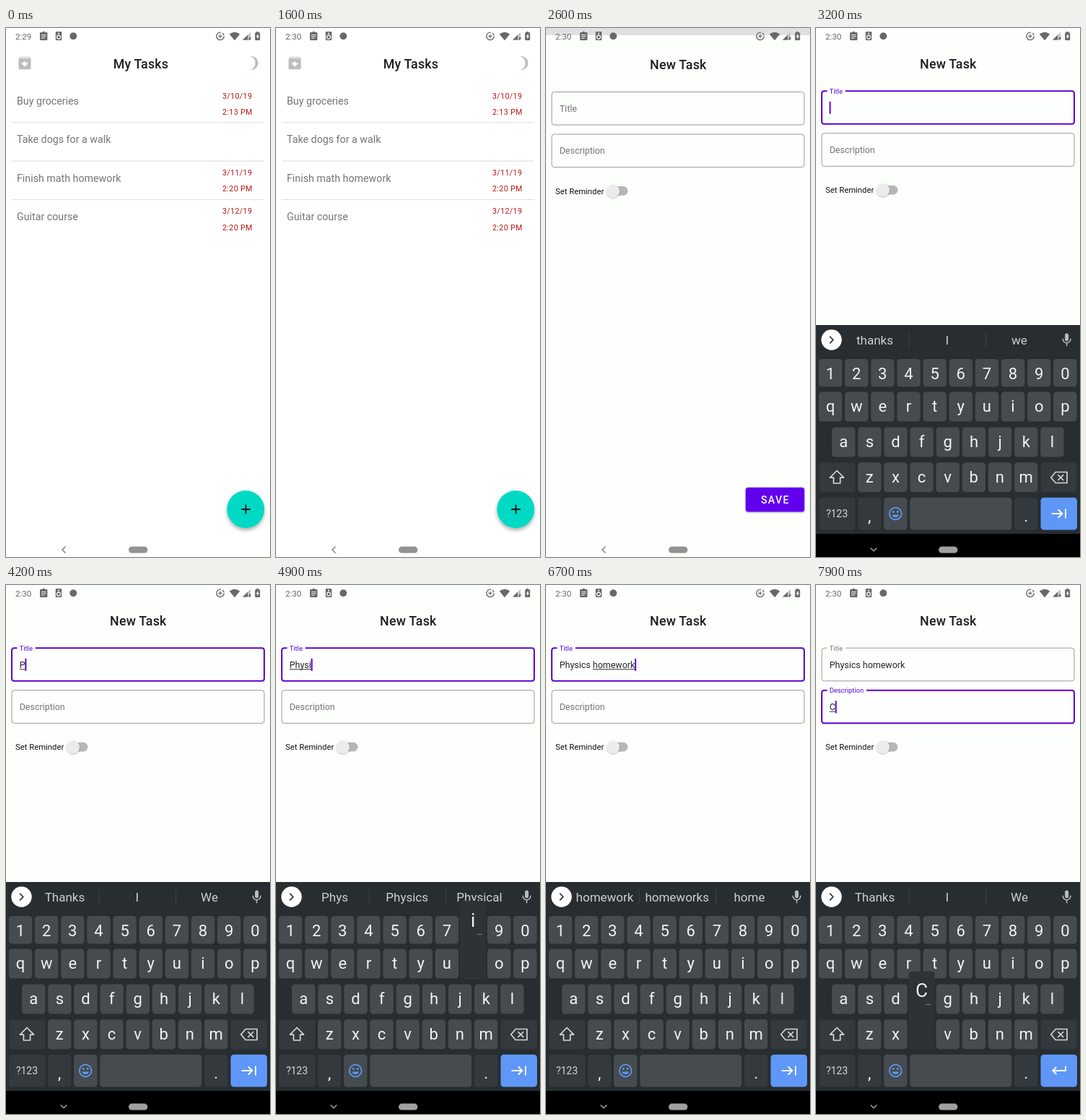
These frames come from a looping animation (366 by 732 pixels, 8 s). An HTML page:

```html
<!DOCTYPE html>
<html lang="en">
<head>
<meta charset="utf-8">
<title>Task list</title>
<style>
html, body { margin: 0; width: 100%; height: 100%; overflow: hidden; background: #fff; }
svg { display: block; width: 100%; height: 100%; font-family: Roboto, "Open Sans", sans-serif; }
text { white-space: pre; }
.mid { text-anchor: middle; }
.head { font-size: 17.8px; font-weight: 500; letter-spacing: .22px; fill: #1d1d1f; text-anchor: middle; }
.item { font-size: 14.24px; fill: #757575; }
.due { font-size: 10.68px; letter-spacing: .36px; fill: #b81414; }
.typed { font-size: 12.46px; fill: #222; }
.key { font-size: 22px; fill: #f1f3f4; text-anchor: middle; }
.pop { font-size: 26px; fill: #f1f3f4; text-anchor: middle; }
.hint { font-size: 17px; fill: #ccd0d3; text-anchor: middle; }
.line { fill: none; stroke-linecap: square; }
</style>
</head>
<body>
<svg id="stage" viewBox="0 0 366 732" preserveAspectRatio="none"></svg>
<script>
const LOOP = 8000;
const PURPLE = '#5d00d6';
const stage = document.getElementById('stage');
const $ = id => document.getElementById(id);

// ---------- markup helpers ----------
const rect = (x, y, w, h, fill, r = 0, more = '') =>
  `<rect x="${x}" y="${y}" width="${w}" height="${h}" rx="${r}" fill="${fill}" ${more}/>`;
const circle = (x, y, r, fill, more = '') =>
  `<circle cx="${x}" cy="${y}" r="${r}" fill="${fill}" ${more}/>`;
const path = (d, fill, more = '') => `<path d="${d}" fill="${fill}" ${more}/>`;
const line = (d, color, w = 1.5, more = '') =>
  `<path class="line" d="${d}" stroke="${color}" stroke-width="${w}" ${more}/>`;
const text = (x, y, cls, str, more = '') => `<text x="${x}" y="${y}" class="${cls}" ${more}>${str}</text>`;
const group = (id, body, more = '') => `<g id="${id}" ${more}>${body}</g>`;

// ---------- task list ----------
const tasks = [
  ['Buy groceries', '3/10/19', '2:13 PM'],
  ['Take dogs for a walk'],
  ['Finish math homework', '3/11/19', '2:20 PM'],
  ['Guitar course', '3/12/19', '2:20 PM']
];

function taskRow([name, day, hour], i) {
  const y = i * 53.3;
  return text(15, 106 + y, 'item', name)
    + (day ? text(300, 97.5 + y, 'due', day) + text(300, 119.8 + y, 'due', hour) : '')
    + (i < 3 ? rect(8, 130.3 + y, 350, 1, '#dcdcdc') : '');
}

const archive = 'M20.54 5.23l-1.39-1.68C18.88 3.21 18.47 3 18 3H6c-.47 0-.88.21-1.16.55L3.46 5.23C3.17 5.57 3 6.02 3 6.5V19c0 1.1.9 2 2 2h14c1.1 0 2-.9 2-2V6.5c0-.48-.17-.93-.46-1.27zM12 17.5L6.5 12H10v-2h4v2h3.5L12 17.5zM5.12 5l.81-1h12l.94 1H5.12z';

const listPage = rect(0, 0, 366, 760, '#fff')
  + path(archive, '#bdbdbd', 'transform="translate(14.6 37.2) scale(.95)"')
  + text(187, 56, 'head', 'My Tasks')
  + path('M338.5 39A9.6 9.6 0 1 1 338.5 58A9.9 9.9 0 0 0 338.5 39Z', '#bdbdbd')
  + tasks.map(taskRow).join('')
  + circle(332.3, 666, 26, '#03dac5', 'filter="url(#lift)"')
  + circle(332.3, 666, 0, '#fff', 'id="ripple"')
  + line('M327 666H338M332.5 660.5V671.5', '#0c1a18', 1.8);

// ---------- new task form ----------
const fields = [
  { id: 'title', label: 'Title', top: 87.2 },
  { id: 'desc', label: 'Description', top: 145.7 }
];

const fieldMarkup = f => path('', 'none', `id="${f.id}Box"`)
  + text(18.7, 0, '', f.label, `id="${f.id}Label"`)
  + text(18.7, f.top + 27.3, 'typed', '', `id="${f.id}Text"`)
  + rect(18.7, f.top + 29, 0, 1, '#333', 0, `id="${f.id}Under"`)
  + rect(18.5, f.top + 14.6, 2, 17, PURPLE, 0, `id="${f.id}Caret"`);

const formPage = rect(0, 0, 366, 760, '#fdfffd')
  + text(183.3, 55.5, 'head', 'New Task')
  + fields.map(fieldMarkup).join('')
  + text(13, 228.4, '', 'Set Reminder', 'font-size="11.3" fill="#111"')
  + rect(88, 217.8, 25.5, 12.6, '#b6b6b6', 6.3)
  + circle(93, 224.2, 8.9, '#ececec', 'filter="url(#soft)"')
  + rect(276.7, 634.4, 81.6, 33.8, '#6200ee', 3.6, 'filter="url(#soft)"')
  + text(298, 656.6, '', 'SAVE', 'font-size="14.24" font-weight="500" letter-spacing="1.27" fill="#fff"');

// ---------- system bars ----------
const G = '#686868';
const statusBar = text(13, 15.6, '', '2:29', `id="clock" font-size="11.6" fill="${G}"`)
  + rect(47, 6, 10.4, 11, G, 1.2) + circle(52.2, 6.2, 1.7, G)
  + line('M49.5 9.5H55M49.5 11.8H55M49.5 14.1H53', '#fff', .9)
  + rect(68.8, 5, 8.4, 12, G, 1.2) + circle(73, 7.6, 1.1, '#fff')
  + circle(73, 12.6, 2.5, 'none', 'stroke="#fff" stroke-width="1.2"')
  + circle(93.3, 11.2, 4.9, G)
  + circle(297, 11.3, 5.2, 'none', `stroke="${G}" stroke-width="1.4" stroke-dasharray="25 2 3.5 2"`)
  + line('M295 11.3H299M297 9.3V13.3', G, 1.2)
  + path('M317 17.2L309.8 8.4Q317 3.2 324.2 8.4Z', G)
  + path('M328 16.6H339V5.8Z', '#c2c2c2') + path('M328 16.6H335V9.7Z', G)
  + path('M338 12l2 2l-2 2.6h-2z', G)
  + path('M347.2 5H350V6.2H351.2Q352.2 6.2 352.2 7.2V16Q352.2 17 351.2 17H346.2Q345.2 17 345.2 16V7.2Q345.2 6.2 346.2 6.2H347.2Z', G)
  + path('M349.5 7.8L346.7 12.2H348.4V15.4L351 11H349.5Z', '#fff');

const navBar = line('M82 718L78 722L82 726', '#858585') + rect(170, 717.6, 26.4, 9, '#929292', 4.5);

// ---------- keyboard ----------
const KEY = '#454b4e', DARK = '#33393d', BLUE = '#5e97f6', ICON = '#d3d6d8';
const PITCH = 36.15;
const rows = [
  { keys: '1234567890', x: 20, y: 458, h: 38.5, base: 486 },
  { keys: 'qwertyuiop', x: 20, y: 503.5, h: 41, base: 531 },
  { keys: 'asdfghjkl', x: 38.2, y: 552.5, h: 41, base: 580 },
  { keys: 'zxcvbnm', x: 74.2, y: 601.3, h: 41, base: 629 }
];
const spots = {};

const keyRow = r => [...r.keys].map((k, i) => {
  const x = r.x + i * PITCH;
  spots[k] = { x, y: r.y };
  return rect(x - 16.2, r.y, 32.4, r.h, KEY, 4.5) + text(x, r.base, 'key', k, `data-key="${k}"`);
}).join('');

const bottomKeys = [
  [4, 50.5, DARK], [58, 32.4, DARK], [94, 32.4, KEY], [130.2, 141, KEY], [275, 32.4, DARK], [311.5, 50.5, BLUE]
].map(([x, w, c]) => rect(x, 649.8, w, 44.8, c, 4.5)).join('');

const keyboard = rect(0, 411, 366, 380, '#272d31') + rect(0, 700, 366, 140, '#000')
  + circle(21.5, 431.5, 14.2, '#fff') + line('M19.7 427.3L23.7 431.5L19.7 435.7', '#2b3135', 1.7)
  + rect(128.6, 421, 1, 22, '#3d4448') + rect(235, 421, 1, 22, '#3d4448')
  + [81.5, 181.7, 282].map((x, i) => text(x, 438.3, 'hint', '', `id="hint${i}"`)).join('')
  + rect(345.1, 422.6, 5, 10.6, '#b9bdc0', 2.5)
  + line('M342.3 430.5a5.3 5.3 0 0 0 10.6 0M347.6 436V439.5', '#b9bdc0', 1.5)
  + rows.map(keyRow).join('')
  + rect(4, 601.3, 50.5, 41, DARK, 4.5) + rect(311.5, 601.3, 50.5, 41, DARK, 4.5)
  + path('M29 612.5L38.5 622.2H33.6V630H24.4V622.2H19.5Z', 'none', `id="shift" stroke="${ICON}" stroke-width="1.7" stroke-linejoin="round"`)
  + line('M332.2 614.5H348V629.5H332.2L325.8 622Z', ICON, 1.7) + line('M335.8 618.6L342.6 625.4M342.6 618.6L335.8 625.4', ICON, 1.7)
  + bottomKeys
  + text(29, 677, 'mid', '?123', `font-size="14" fill="${ICON}"`)
  + text(74.2, 683, 'key', ',') + text(291.2, 683, 'key', '.')
  + circle(110.2, 672, 8.4, 'none', `stroke="${BLUE}" stroke-width="1.7"`)
  + circle(107.2, 669.5, 1.4, BLUE) + circle(113.2, 669.5, 1.4, BLUE)
  + path('M105.4 673.6H115A4.9 4.4 0 0 1 105.4 673.6Z', BLUE)
  + line('M327.5 672H341M336.3 667L341.3 672L336.3 677M346 666.5V677.5', '#fff', 1.9, 'id="next"')
  + line('M346 667V672H328.5M332.7 667.7L328.4 672L332.7 676.3', '#fff', 1.9, 'id="enter"')
  + line('M76.2 720L80 723.8L83.8 720', '#a0a0a0') + rect(170, 717.6, 26.4, 9, '#a0a0a0', 4.5)
  + group('pops', '');

stage.innerHTML = `<defs>
  <filter id="lift" x="-30%" y="-30%" width="160%" height="170%"><feDropShadow dx="0" dy="3" stdDeviation="2.6" flood-opacity=".32"/></filter>
  <filter id="soft" x="-30%" y="-30%" width="160%" height="180%"><feDropShadow dx="0" dy="1" stdDeviation="1" flood-opacity=".3"/></filter>
  <clipPath id="reveal">${rect(0, 0, 366, 760, '#000', 0, 'id="revealBox"')}</clipPath>
</defs>`
  + group('list', listPage)
  + rect(0, 0, 366, 732, '#000', 0, 'id="dim"')
  + group('form', formPage, 'clip-path="url(#reveal)"')
  + statusBar + navBar
  + group('board', keyboard);

// ---------- timing ----------
const clamp = v => Math.max(0, Math.min(1, v));
const span = (t, start, length) => clamp((t - start) / length);
const easeOut = v => 1 - (1 - v) * (1 - v);
const mix = (a, b, p) => a + (b - a) * p;

// cubic-bezier(.4, 0, .2, 1)
function standard(x) {
  let lo = 0, hi = 1;
  for (let i = 0; i < 24; i++) {
    const s = (lo + hi) / 2, q = 1 - s;
    if (1.2 * q * q * s + .6 * q * s * s + s * s * s < x) lo = s; else hi = s;
  }
  return 3 * lo * lo - 2 * lo * lo * lo;
}

const OPEN = 2285, FOCUS = 2910, MOVE = 7000;
const COMMIT = 90, HOLD = 180;
const script = (str, times) => [...str].map((ch, i) => ({ ch, at: times[i] }));
const titleKeys = script('Physics homework',
  [3990, 4280, 4460, 4640, 4800, 4960, 5140, 5320, 5600, 5720, 5860, 5990, 6110, 6230, 6350, 6480]);
const descKeys = script('C', [7800]);
const presses = [...titleKeys, ...descKeys];
const typedBy = (keys, t) => keys.filter(k => t >= k.at + COMMIT).map(k => k.ch).join('');

const hints = [
  [0, 'thanks I we'], [3300, 'Thanks I We'], [4450, 'Ph Phone Photo'], [4650, 'Phys Physics Physical'],
  [4960, 'Physics Physical Physician'], [5480, 'test and lab'], [5780, 'he have his'],
  [5960, 'home hope how'], [6280, 'homework home homes'], [6680, 'homework homeworks home'],
  [7080, 'thanks I we'], [7200, 'Thanks I We']
];

const set = (id, attrs) => { for (const k in attrs) $(id).setAttribute(k, attrs[k]); };
const show = (id, on) => set(id, { visibility: on ? 'inherit' : 'hidden' });

// ---------- drawing ----------
function drawField(f, t, start, end, keys) {
  const focused = t >= start && t < end;
  const p = easeOut(span(t, start, 170));
  const color = focused ? PURPLE : '#757575';
  const words = typedBy(keys, t);
  const label = $(f.id + 'Label');
  set(label.id, { 'font-size': mix(12.46, 9.35, p), y: mix(f.top + 27.3, f.top + 3.6, p), fill: color });

  const gap = 15.5 + (label.getComputedTextLength() + 7) * p;
  const top = f.top, low = top + 45.6;
  set(f.id + 'Box', {
    d: `M${gap} ${top}H354.5Q358 ${top} 358 ${top + 3.5}V${low - 3.5}Q358 ${low} 354.5 ${low}H11.5Q8 ${low} 8 ${low - 3.5}V${top + 3.5}Q8 ${top} 11.5 ${top}H15.5`,
    stroke: focused ? PURPLE : '#999', 'stroke-width': focused ? 2 : 1
  });

  const el = $(f.id + 'Text');
  el.textContent = words;
  const width = words ? el.getComputedTextLength() : 0;
  const cut = words.lastIndexOf(' ') + 1;
  const from = cut ? el.getSubStringLength(0, cut) : 0;
  set(f.id + 'Under', { x: 18.7 + from, width: focused ? Math.max(0, width - from) : 0 });

  const last = keys.reduce((m, k) => t >= k.at + COMMIT ? k.at + COMMIT : m, start);
  set(f.id + 'Caret', { x: 18.5 + width });
  show(f.id + 'Caret', focused && (t - last) % 1000 < 500);
}

function drawBoard(t) {
  const p = easeOut(span(t, 2970, 200));
  show('board', p > 0);
  if (!p) return;
  set('board', { opacity: p, transform: `translate(0 ${60 * (1 - p)})` });

  const caps = (t >= 3300 && t < 3990 + COMMIT) || (t >= 7200 && t < 7800 + COMMIT);
  stage.querySelectorAll('[data-key]').forEach(el => {
    const k = el.dataset.key;
    el.textContent = caps ? k.toUpperCase() : k;
  });
  set('shift', { fill: caps ? ICON : 'none' });

  const words = hints.filter(h => t >= h[0]).pop()[1].split(' ');
  words.forEach((w, i) => { $('hint' + i).textContent = w; });
  show('next', t < MOVE);
  show('enter', t >= MOVE);

  $('pops').innerHTML = presses.filter(k => k.ch !== ' ' && t >= k.at && t < k.at + HOLD).map(({ ch }) => {
    const { x, y } = spots[ch.toLowerCase()];
    const top = y - 66.5;
    return rect(x - 18, top, 36, 107.3, '#2d3235', 4)
      + text(x, top + 35.5, 'pop', ch)
      + ('aceinosuy'.includes(ch.toLowerCase()) ? text(x + 9, top + 46.5, 'mid', '…', 'font-size="11" fill="#e3e5e6"') : '');
  }).join('');
}

function draw(t) {
  $('clock').textContent = t < 500 ? '2:29' : '2:30';

  const tap = span(t, 2080, 220);
  set('ripple', { r: 26 * easeOut(tap), opacity: .28 * (1 - tap * .4) * (tap > 0) });

  const p = standard(span(t, OPEN, 425));
  const rest = 1 - p;
  set('list', { transform: `translate(0 ${-14.3 * p})` });
  set('dim', { opacity: .12 * span(t, OPEN, 117) });
  show('form', t > OPEN);
  set('form', { transform: `translate(0 ${30 * rest})` });
  set('revealBox', { y: 702 * Math.pow(rest, 1.4) });

  drawField(fields[0], t, FOCUS, MOVE, titleKeys);
  drawField(fields[1], t, MOVE, LOOP, descKeys);
  drawBoard(t);
}

const began = performance.now();
function tick() {
  draw((performance.now() - began) % LOOP);
  requestAnimationFrame(tick);
}
tick();
</script>
</body>
</html>
```
